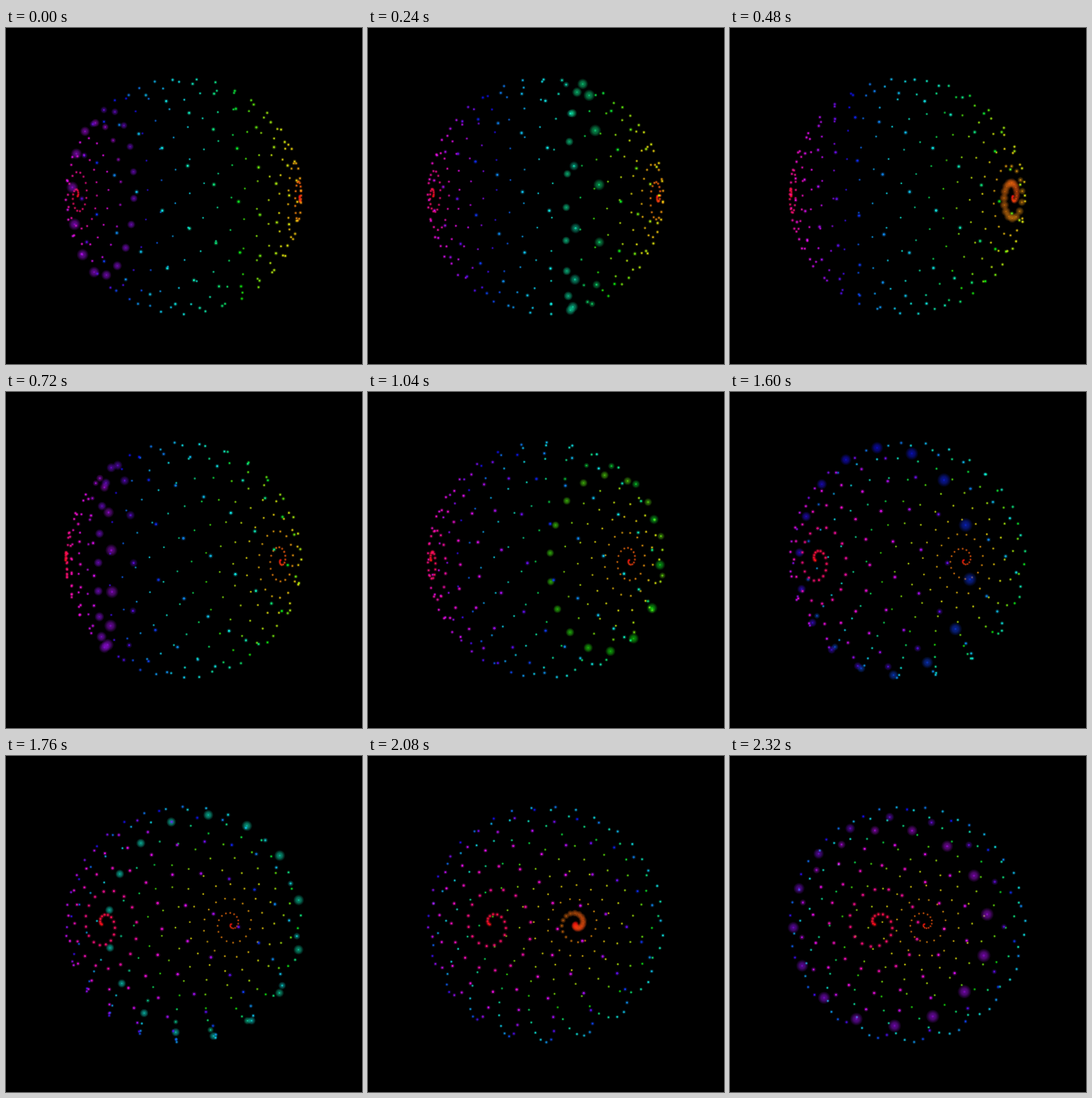
These frames come from a looping animation (396x373 px, 2400 ms). An HTML page with a canvas:

```html
<!DOCTYPE html>
<html lang="en">
<head>
<meta charset="utf-8">
<title>Spiral sphere</title>
<style>
  html, body { margin: 0; width: 100%; height: 100%; overflow: hidden; background: #000; }
  canvas { display: block; }
</style>
</head>
<body>
<canvas id="stage" width="396" height="373"></canvas>
<script>
const ctx = document.getElementById('stage').getContext('2d');
const LOOP = 2400, STEP = 80;
const CX = 197.6, CY = 186.6;
const DOTS = 300, TURN = 0.4;      // dots from pole to pole, radians per dot
const DIST = 3.3, ZOOM = 412.5;    // camera distance in sphere radii, focal length
const RAD = Math.PI / 180;
const LAP = 316;                   // dots covered by one lap of the pulse

// Pulse position along the spiral as [step, unwrapped dot index]
const PULSE = [[0, 224], [3, 125], [9, -94], [13, -220], [17, -342], [22, -493], [30, -757]];

function pulseAt(n) {
  let k = 1;
  while (k < PULSE.length - 1 && n > PULSE[k][0]) k++;
  const [n0, p0] = PULSE[k - 1], [n1, p1] = PULSE[k];
  const p = p0 + (p1 - p0) * (n - n0) / (n1 - n0);
  return ((p % LAP) + LAP) % LAP;
}

// Rainbow with gamma-lifted channels, which widens yellow, cyan and magenta
function rainbow(turn) {
  return [0, 2, 4].map(shift => {
    const h = (turn * 6 - shift + 9) % 6 - 3;
    const level = Math.min(1, Math.max(0, 2 - Math.abs(h)));
    return Math.round(255 * Math.max(0.06, Math.pow(level, 0.6)));
  }).join();
}

function disc(x, y, r, fill) {
  ctx.fillStyle = fill;
  ctx.beginPath();
  ctx.arc(x, y, r, 0, 2 * Math.PI);
  ctx.fill();
}

function glow(x, y, r, rgb, alpha) {
  const g = ctx.createRadialGradient(x, y, 0, x, y, r);
  const tone = a => `rgba(${rgb},${a * alpha})`;
  g.addColorStop(0, tone(1));
  g.addColorStop(0.45, tone(0.75));
  g.addColorStop(0.75, tone(0.33));
  g.addColorStop(1, tone(0));
  disc(x, y, r, g);
}

// Dot i on the sphere, with the axis swung by phi about the vertical
function place(i, phi) {
  const theta = Math.PI * i / DOTS, az = TURN * i;
  const along = Math.cos(theta), ring = Math.sin(theta);
  const side = -ring * Math.cos(az);
  const x = along * Math.sin(phi) + side * Math.cos(phi);
  const y = ring * Math.sin(az);
  const z = -along * Math.cos(phi) + side * Math.sin(phi);
  const s = ZOOM / (DIST - z);
  return { i, z, x: CX + x * s, y: CY + y * s, size: DIST / (DIST - z) };
}

function draw(n) {
  const phi = (98.3 - 3 * n) * RAD;
  const pulse = pulseAt(n);
  ctx.fillStyle = '#000';
  ctx.fillRect(0, 0, 396, 373);

  const dots = [];
  for (let i = 0; i < DOTS; i++) dots.push(place(i, phi));
  dots.sort((a, b) => a.z - b.z);

  for (const { i, x, y, size } of dots) {
    const rgb = rainbow(i / DOTS);
    const lift = Math.exp(-Math.pow(Math.abs(i - pulse) / 9.5, 3));
    glow(x, y, (2.3 + 3.7 * lift) * size, rgb, 0.36 + 0.22 * lift);
    disc(x, y, 0.9 * size, `rgba(${rgb},${0.8 - 0.5 * lift})`);
  }
}

function tick(now) {
  draw(Math.floor((now % LOOP) / STEP));
  requestAnimationFrame(tick);
}
draw(0);
requestAnimationFrame(tick);
</script>
</body>
</html>
```
